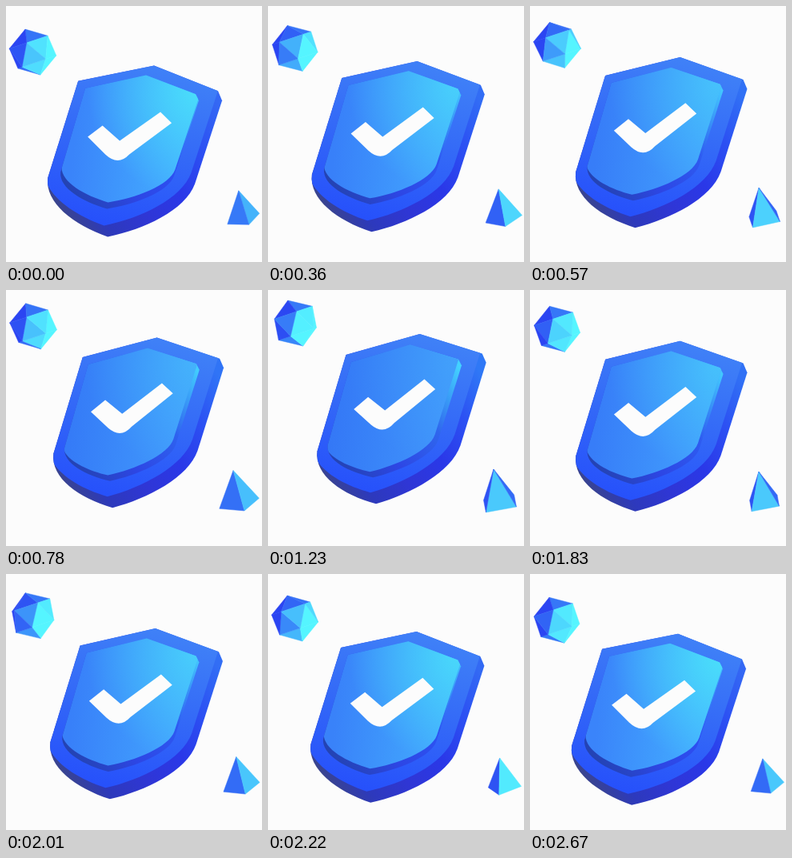
Write an HTML page with a canvas that moves like this. It is 320 px wide and 320 px high and loops after 2700 ms.

```html
<!DOCTYPE html>
<html>
<head>
<meta charset="utf-8">
<title>Shield</title>
<style>
html, body { margin: 0; width: 100%; height: 100%; overflow: hidden; background: #fcfcfc; }
canvas { display: block; width: 320px; height: 320px; }
</style>
</head>
<body>
<canvas id="stage" width="320" height="320"></canvas>
<script>
const ctx = document.getElementById('stage').getContext('2d');
const LOOP = 2700, STEP = 30, PAPER = '#fcfcfc';

const sin = deg => Math.sin(deg * Math.PI / 180);
const cos = deg => Math.cos(deg * Math.PI / 180);
const clamp = v => Math.max(0, Math.min(1, v));
const lerp = (a, b, k) => a + (b - a) * k;
const rgb = hex => [1, 3, 5].map(i => parseInt(hex.slice(i, i + 2), 16));
function mix(a, b, k) {
  const to = rgb(b);
  return `rgb(${rgb(a).map((v, i) => Math.round(lerp(v, to[i], k)))})`;
}
const dot = (a, b) => a[0] * b[0] + a[1] * b[1] + a[2] * b[2];
const unit = a => a.map(v => v / Math.hypot(...a));
const cross = (a, b) => [
  a[1] * b[2] - a[2] * b[1],
  a[2] * b[0] - a[0] * b[2],
  a[0] * b[1] - a[1] * b[0]
];

// Outlines in the lowest pose: three corners, two curves, two corners.
const RIM = [185,75, 90,94, 52,215, 48,246, 84,274, 127,289, 172,280, 224,256, 236,223, 270,119, 265,107];
const PANEL = [175,87, 99,103, 68,208, 66,228, 96,245, 126,254, 160,249, 203,233, 210,213, 241,119, 237,111];
const TICK = [102,164, 120.5,150, 142,169, 193,133, 207,147, 154,186, 140,201, 124,186];

// Rising also tilts the shield; raised parts shift a little against the rim.
function tilt(points, s, lift) {
  return points.map((v, i) => {
    const x = points[i - i % 2], y = points[i - i % 2 + 1];
    return i % 2
      ? y - s * (3 + 0.08 * x + 0.03 * y - lift)
      : x + s * (9.3 - 0.028 * x + 0.008 * y - 2.5 * lift);
  });
}

function trace(p) {
  ctx.beginPath();
  for (let i = 0; i < 6; i += 2) ctx.lineTo(p[i], p[i + 1]);
  ctx.bezierCurveTo(...p.slice(6, 12));
  ctx.bezierCurveTo(...p.slice(12, 18));
  for (let i = 18; i < p.length; i += 2) ctx.lineTo(p[i], p[i + 1]);
  ctx.closePath();
}

function gradient(x0, y0, x1, y1, ...colors) {
  const g = ctx.createLinearGradient(x0, y0, x1, y1);
  colors.forEach((c, i) => g.addColorStop(i / (colors.length - 1), c));
  return g;
}

// A slab is its outline as the side, and the same outline moved up as the face.
function slab(p, dx, dy, side, ...faces) {
  trace(p);
  ctx.fillStyle = side;
  ctx.fill();
  ctx.save();
  ctx.clip();
  ctx.translate(dx, dy);
  trace(p);
  for (const face of faces) {
    ctx.fillStyle = face;
    ctx.fill();
  }
  ctx.restore();
}

function glow(x, y, r, alpha) {
  const g = ctx.createRadialGradient(x, y, 0, x, y, r);
  g.addColorStop(0, `rgba(74, 226, 250, ${alpha})`);
  g.addColorStop(1, 'rgba(74, 226, 250, 0)');
  return g;
}

function shield(s) {
  const dy = -20 * s;
  slab(tilt(RIM, s, 0), lerp(-4.5, -7, s), -14,
    gradient(60, 260 + dy, 270, 130 + dy,
      '#3d4783', '#2d39bc', '#2f36d6', '#2a38e8', '#2c50f3', mix('#3468f4', '#2f78f6', s)),
    gradient(180, 90 + dy, 130, 290 + dy, '#3f80f7', '#3368f7', '#2650fb'));
  slab(tilt(PANEL, s, 1), lerp(1.5, -4, s), lerp(-8, -7, s),
    gradient(75, 230 + dy, 240, 118 + dy,
      '#2343b0', '#2d46e4', mix('#2c50f4', '#2f66ee', s), mix('#40b8fc', '#43d2ff', s)),
    gradient(85, 150, 225, 160, mix('#3a84fa', '#3478f6', s), mix('#44b0ff', '#4094fb', s)),
    glow(240, 112 + dy, 140, 0.95 - 0.8 * s));

  const p = tilt(TICK, s, 1);
  ctx.beginPath();
  for (let i = 0; i < 12; i += 2) ctx.lineTo(p[i], p[i + 1]);
  ctx.quadraticCurveTo(...p.slice(12));
  ctx.fillStyle = PAPER;
  ctx.fill();
}

function poly(points, color) {
  ctx.beginPath();
  points.forEach(p => ctx.lineTo(p[0], p[1]));
  ctx.closePath();
  ctx.fillStyle = ctx.strokeStyle = color;
  ctx.lineWidth = 0.5;
  ctx.fill();
  ctx.stroke();
}

const tone = k => k < 0.5
  ? mix('#2b45f2', '#3a8cf9', k * 2)
  : mix('#3a8cf9', '#55f5ff', k * 2 - 1);

// Icosahedron turning about an axis through two of its corners.
const LIGHT = unit([0.75, 0.25, 0.55]);
const AXIS = unit([-9.5, -28.5, 0]);
const AHEAD = [0, 0, 1];
const SIDE = cross(AHEAD, AXIS);

function gem(u, s) {
  const turn = -8 - 720 * u - 12 * sin(180 * u);
  const ring = [0, 1, 2, 3, 4].map(k => {
    const a = turn + 72 * k;
    return AXIS.map((v, i) => 0.447 * v + 0.894 * (cos(a) * AHEAD[i] + sin(a) * SIDE[i]));
  });
  const flip = v => v.map(c => -c);
  ring.forEach((v, i) => {
    const next = ring[(i + 1) % 5];
    for (const face of [[AXIS, v, next], [v, next, flip(ring[(i + 3) % 5])]]) {
      for (const f of [face, face.map(flip)]) {
        const n = unit([0, 1, 2].map(c => f[0][c] + f[1][c] + f[2][c]));
        if (n[2] <= 0) continue;
        const pts = f.map(p => [33.5 + 0.8 * s + 30 * p[0], 58 - 16.5 * s + 30 * p[1]]);
        poly(pts, tone(clamp((dot(n, LIGHT) + 0.25) / 1.05)));
      }
    }
  });
}

// Square pyramid turning the other way, growing as it rises.
function pyramid(u, s) {
  const turn = 19 + 720 * u - 24 * sin(180 * u) - 14 * sin(360 * u);
  const x = 291 - 9 * s, y = 231 - 7 * s;
  const corner = a => [
    x + 6 + 2 * s + (21 + 6 * s) * sin(a),
    y + 35 + 8 * s - 4 * sin(a) + (9 + 2 * s) * cos(a)
  ];
  for (let k = 0; k < 4; k++) {
    const a = turn + 90 * k, p = corner(a), q = corner(a + 90);
    if ((q[0] - x) * (p[1] - y) <= (q[1] - y) * (p[0] - x)) continue;
    const lit = Math.max(0, cos(a + 45 - 30));
    poly([[x, y], p, q], tone(0.1 + 0.85 * lit * lit));
  }
}

function draw(now) {
  const u = Math.floor((now % LOOP) / STEP) * STEP / LOOP;
  const s = (1 - cos(360 * u + 19)) / 2;
  ctx.fillStyle = PAPER;
  ctx.fillRect(0, 0, 320, 320);
  shield(s);
  gem(u, s);
  pyramid(u, s);
}

let start;
function loop(now) {
  if (start === undefined) start = now;
  draw(now - start);
  requestAnimationFrame(loop);
}
draw(0);
requestAnimationFrame(loop);
</script>
</body>
</html>
```
